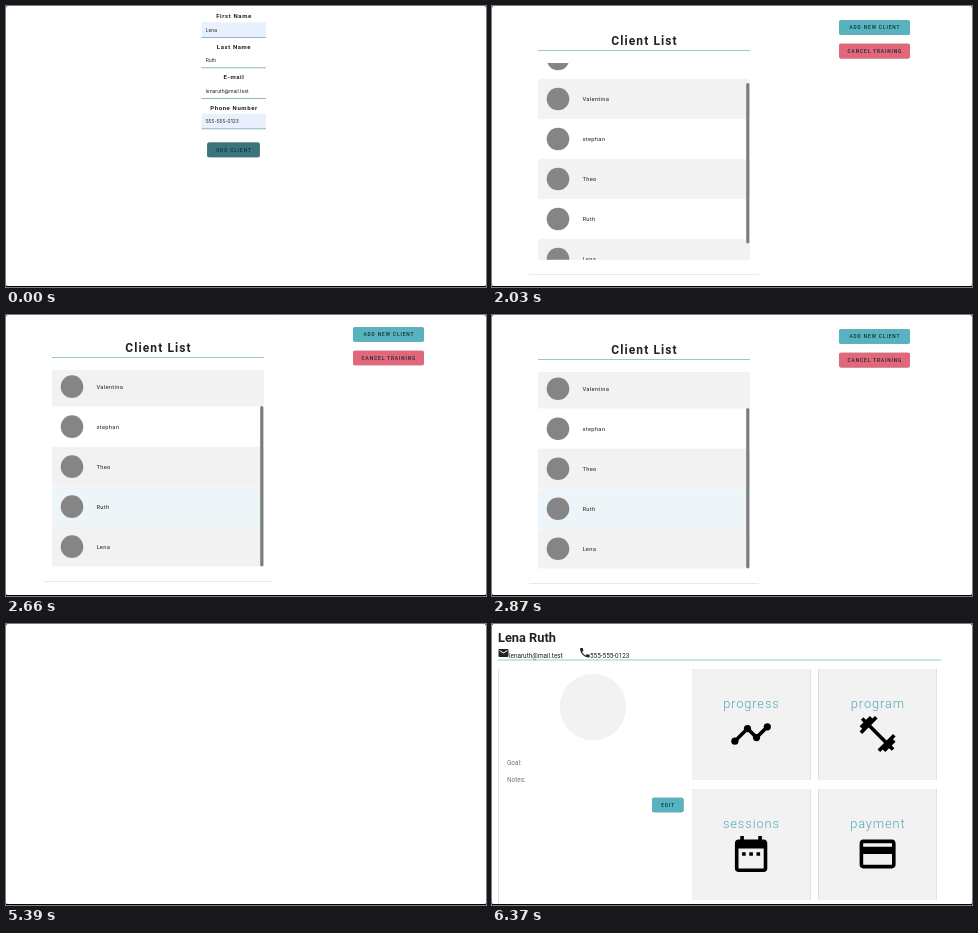
An HTML page that plays this animation: 480 px wide and 281 px high, repeating every 6440 ms.

```html
<!DOCTYPE html>
<html lang="en">
<head>
<meta charset="utf-8">
<title>Client list</title>
<style>
  html, body { margin: 0; width: 100%; height: 100%; overflow: hidden; background: #000; }
  svg { display: block; font-family: Roboto, sans-serif; fill: #222; }
  .mid { text-anchor: middle; }
  .label { font-weight: 700; font-size: 6px; letter-spacing: .6px; }
  .input { font: 4.9px Inter, sans-serif; }
  .btn { font-weight: 500; font-size: 4.8px; letter-spacing: .9px; }
  .title { font-weight: 700; font-size: 12px; letter-spacing: 1.1px; }
  .name { font-size: 5.8px; letter-spacing: .3px; }
  .tile { font-weight: 300; font-size: 12.8px; letter-spacing: .9px; fill: #4fa9b3; }
  .info { font-size: 6.4px; }
  .note { font-size: 6.4px; fill: #777; }
  .raised { filter: drop-shadow(0 .5px .6px #0007); }
</style>
</head>
<body>
<svg width="480" height="281" viewBox="0 0 480 281">
  <clipPath id="listClip"><rect x="46" y="57" width="212" height="196.7"/></clipPath>
  <clipPath id="pageClip"><rect width="480" height="280"/></clipPath>
  <rect width="480" height="280" rx="1.5" fill="#fff"/>
  <g clip-path="url(#pageClip)">
    <g id="form"></g>

    <g id="list">
      <rect class="raised" x="37" y="6" width="230" height="262.3" rx="1" fill="#fff"/>
      <text class="title mid" x="152.5" y="39.3">Client List</text>
      <rect x="46" y="44.1" width="212" height=".8" fill="#7fbcc3"/>
      <g clip-path="url(#listClip)"><g id="rows"></g></g>
      <rect id="thumb" x="254.2" y="57" width="3.2" height="160.5" rx="1.6" fill="#7d7d7d"/>
    </g>

    <g id="profile">
      <text x="6" y="18.2" font-size="12.8" font-weight="700">Lena Ruth</text>
      <path transform="translate(5.5 23) scale(.5)" d="M20 4H4c-1.1 0-2 .9-2 2v12c0 1.1.9 2 2 2h16c1.1 0 2-.9 2-2V6c0-1.1-.9-2-2-2zm0 4l-8 5-8-5V6l8 5 8-5v2z"/>
      <text class="info" x="17" y="33.6">lenaruth@mail.test</text>
      <path transform="translate(86.5 22.4) scale(.53)" d="M6.62 10.79c1.44 2.83 3.76 5.14 6.59 6.59l2.2-2.2c.27-.27.67-.36 1.02-.24 1.12.37 2.33.57 3.57.57.55 0 1 .45 1 1V20c0 .55-.45 1-1 1-9.39 0-17-7.61-17-17 0-.55.45-1 1-1h3.5c.55 0 1 .45 1 1 0 1.25.2 2.45.57 3.57.11.35.03.74-.25 1.02z"/>
      <text class="info" x="98" y="33.6">555-555-0123</text>
      <rect x="6" y="35.6" width="443" height=".8" fill="#7fbcc3"/>
      <rect class="raised" x="6.5" y="45" width="189.5" height="250" rx="1" fill="#fff"/>
      <circle cx="101" cy="83" r="33.3" fill="#f2f2f2"/>
      <text class="note" x="15" y="140.6">Goal:</text>
      <text class="note" x="15" y="158.2">Notes:</text>
      <g id="tiles" fill="#000"></g>
    </g>
  </g>
</svg>
<script>
const LOOP = 6440, STEP = 70;
const TEAL = '#57b3bf', GREY = '#f2f2f2', HOVER = '#edf5f9';
const $ = id => document.getElementById(id);
const add = (id, markup) => $(id).insertAdjacentHTML('beforeend', markup);
const clamp = x => Math.max(0, Math.min(1, x));

const button = (id, label, x, y, w, fill, ink = '#12282c') =>
  `<rect id="${id}" class="raised" x="${x}" y="${y}" width="${w}" height="14.6" rx="1.8" fill="${fill}"/>
   <text class="btn mid" x="${x + w / 2 + .4}" y="${y + 9.1}" fill="${ink}">${label}</text>`;

// Entry form
[['First Name', 'Lena', '#e8f0fe'], ['Last Name', 'Ruth', '#fff'],
 ['E-mail', 'lenaruth@mail.test', '#fff'], ['Phone Number', '555-555-0123', '#e8f0fe']]
  .forEach(([label, value, fill], i) => add('form', `<g transform="translate(0 ${i * 30.5})">
    <text class="label mid" x="228" y="12">${label}</text>
    <rect x="195.5" y="16.3" width="64.5" height="15" fill="${fill}"/>
    <rect x="195.5" y="31" width="64.5" height=".7" fill="#5f9ca3"/>
    <text class="input" x="199.7" y="25.8">${value}</text></g>`));
add('form', button('addClient', 'ADD CLIENT', 201.2, 136.6, 52.6, '#3b747c', '#122c31'));

// Client list
add('list', button('addNew', 'ADD NEW CLIENT', 347, 14.2, 71, TEAL) +
            button('cancel', 'CANCEL TRAINING', 347, 37.8, 71, '#e2677a'));
['Lena', 'Valentina', 'stephan', 'Theo', 'Ruth', 'Lena'].forEach((name, i) => {
  const y = 57 + i * 40;
  add('rows', `<rect class="row" x="46" y="${y}" width="212" height="40" rx="2"/>
    <circle cx="66" cy="${y + 20}" r="11.3" fill="#858585"/>
    <text class="name" x="90.4" y="${y + 22.1}">${name}</text>`);
});
const rows = [...document.querySelectorAll('.row')];

// Profile tiles
const icons = {
  progress: `<path d="M3 16 10 9l5 5 6-6" fill="none" stroke="#000" stroke-width="2"/>` +
    [[3, 16], [10, 9], [15, 14], [21, 8]].map(([x, y]) => `<circle cx="${x}" cy="${y}" r="2"/>`).join(''),
  program: `<path d="M20.57 14.86 22 13.43 20.57 12 17 15.57 8.43 7 12 3.43 10.57 2 9.14 3.43 7.71 2 5.57 4.14 4.14 2.71 2.71 4.14l1.43 1.43L2 7.71l1.43 1.43L2 10.57 3.43 12 7 8.43 15.57 17 12 20.57 13.43 22l1.43-1.43L16.29 22l2.14-2.14 1.43 1.43 1.43-1.43-1.43-1.43L22 16.29z"/>`,
  sessions: `<path d="M9 11H7v2h2zm4 0h-2v2h2zm4 0h-2v2h2zm2-7h-1V2h-2v2H8V2H6v2H5c-1.1 0-2 .9-2 2v14c0 1.1.9 2 2 2h14c1.1 0 2-.9 2-2V6c0-1.1-.9-2-2-2zm0 16H5V9h14z"/>`,
  payment: `<path d="M20 4H4c-1.1 0-2 .9-2 2v12c0 1.1.9 2 2 2h16c1.1 0 2-.9 2-2V6c0-1.1-.9-2-2-2zm0 14H4v-6h16zm0-10H4V6h16z"/>`
};
Object.entries(icons).forEach(([name, icon], i) => {
  const x = 200 + i % 2 * 126.5, y = 45 + (i >> 1) * 120;
  add('tiles', `<rect id="${name}" class="raised" x="${x}" y="${y}" width="118.3" height="111" rx="1" fill="${GREY}"/>
    <text class="tile mid" x="${x + 59.4}" y="${y + 39}">${name}</text>
    <g transform="translate(${x + 37.5} ${y + 43.4}) scale(1.8)">${icon}</g>`);
});
add('tiles', button('edit', 'EDIT', 160, 173.7, 31.5, TEAL));

const show = (id, on) => $(id).style.display = on ? '' : 'none';
const lift = (id, k) => $(id).style.filter =
  `drop-shadow(0 ${.5 + k}px ${.6 + k}px #0007)`;

function draw(now) {
  const t = Math.floor(now % LOOP / STEP) * STEP;
  show('form', t < 560);
  show('list', t >= 560 && t < 5390);
  show('profile', t >= 5530);
  show('rows', t >= 840);

  // Scroll to the end, then overscroll the page
  const left = 1 - clamp((t - 1960) / 210);
  const scroll = 43.3 * (1 - left * left);
  const bounce = -2.1 * Math.sin(Math.PI * clamp((t - 2380) / 490));
  $('rows').setAttribute('transform', `translate(0 ${-scroll})`);
  $('list').setAttribute('transform', `translate(0 ${bounce})`);
  $('thumb').setAttribute('y', 57 + scroll * .83);
  $('thumb').setAttribute('opacity', t < 2030 ? 0 : 1 - clamp((t - 2940) / 280));

  const hovered = t < 2100 ? -1 : t < 2590 ? 3 : t < 3360 ? 4 : 5;
  rows.forEach((row, i) => row.setAttribute('fill', i === hovered ? HOVER : i % 2 ? GREY : '#fff'));

  // Pointer passes the edit button and the sessions tile
  lift('edit', t < 5950 ? 0 : t < 6090 ? .7 : .7 * (1 - clamp((t - 6020) / 210)));
  lift('sessions', t < 6370 ? clamp((t - 6020) / 210) : 0);
  requestAnimationFrame(() => draw(performance.now() - start));
}
const start = performance.now();
draw(0);
</script>
</body>
</html>
```
